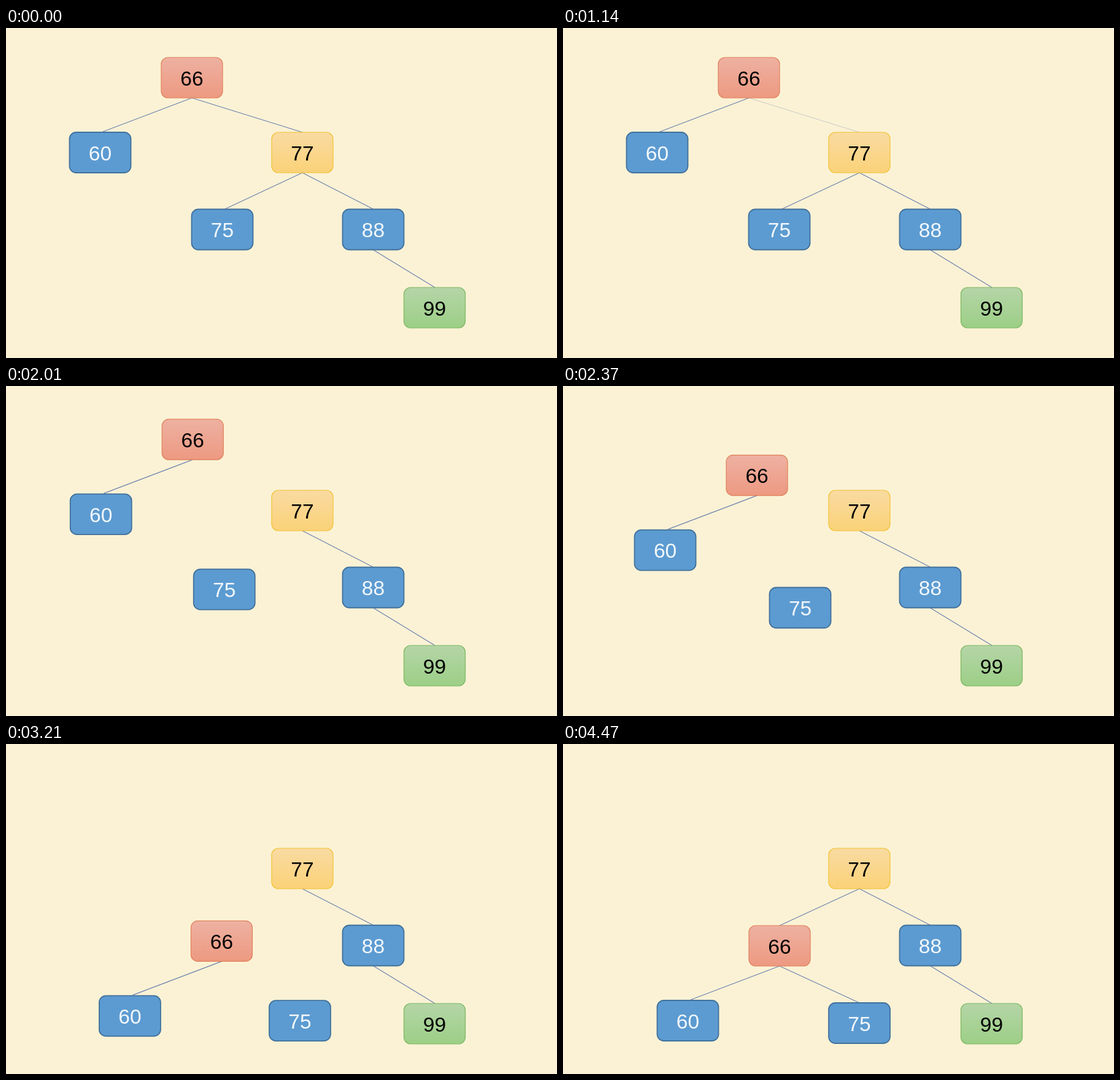
These frames come from a looping animation (898x538 px, 4.71 s). An HTML page with a canvas:

```html
<!DOCTYPE html>
<html lang="en">
<head>
<meta charset="utf-8">
<title>Tree rotation</title>
<style>
  html, body { margin: 0; overflow: hidden; background: #fbf2d5; }
  canvas { display: block; }
</style>
</head>
<body>
<canvas width="898" height="538"></canvas>
<script>
const ctx = document.querySelector('canvas').getContext('2d');
const LOOP = 4710, STEP = 30;

// top fill, bottom fill, border, text, border width
const styles = {
  blue: ['#5c9bd1', '#5c9bd1', '#41719c', '#f3f8fc', 1.8],
  red: ['#eeb1a2', '#ed9981', '#e0805a', '#000', 1.2],
  yellow: ['#f9dba2', '#fbd278', '#f2c231', '#000', 1.2],
  green: ['#b5d5a7', '#9ccf86', '#7cb860', '#000', 1.2]
};

const progress = (t, start, length) => Math.min(1, Math.max(0, (t - start) / length));
const smooth = u => u * u * (3 - 2 * u);

function edge(x1, y1, x2, y2, alpha = 1) {
  ctx.globalAlpha = alpha;
  ctx.strokeStyle = '#6b80ae';
  ctx.lineWidth = 1.2;
  ctx.beginPath();
  ctx.moveTo(x1, y1);
  ctx.lineTo(x2, y2);
  ctx.stroke();
  ctx.globalAlpha = 1;
}

function node(label, x, y, style) {
  const [top, bottom, border, ink, width] = styles[style];
  const fill = ctx.createLinearGradient(0, y - 33, 0, y + 33);
  fill.addColorStop(0, top);
  fill.addColorStop(1, bottom);
  ctx.fillStyle = fill;
  ctx.strokeStyle = border;
  ctx.lineWidth = width;
  ctx.beginPath();
  ctx.roundRect(x - 50, y - 33, 100, 66, 11);
  ctx.fill();
  ctx.stroke();
  ctx.fillStyle = ink;
  ctx.fillText(label, x, y + 12.5);
}

function draw(t) {
  ctx.fillStyle = '#fbf2d5';
  ctx.fillRect(0, 0, 898, 538);
  ctx.font = '33.5px "Liberation Sans", Arial, sans-serif';
  ctx.textAlign = 'center';

  const fade = start => progress(t, start, 500);
  const move = smooth(progress(t, 1869, 1498));
  const dx = 50 * move, dy = 248 * move;

  edge(303, 114, 483, 170, 1 - fade(800));
  edge(483, 236, 355, 296, 1 - fade(1340));
  edge(353, 362, 483, 422, fade(3368));
  edge(483, 236, 353, 296, fade(3950));
  edge(303 + dx, 114 + dy, 158 + dx, 169 + dy);
  edge(483, 236, 598, 295);
  edge(599, 362, 699, 423);

  node('60', 153.5 + dx, 203 + dy, 'blue');
  node('75', 352.5 + 130.5 * move, 328.5 + 126.5 * move, 'blue');
  node('66', 303 + dx, 81 + dy, 'red');
  node('77', 483, 203, 'yellow');
  node('88', 598.5, 328.5, 'blue');
  node('99', 698.5, 456, 'green');
}

function tick() {
  const t = performance.now() % LOOP;
  draw(Math.floor(t / STEP) * STEP);
  requestAnimationFrame(tick);
}
tick();
</script>
</body>
</html>
```
